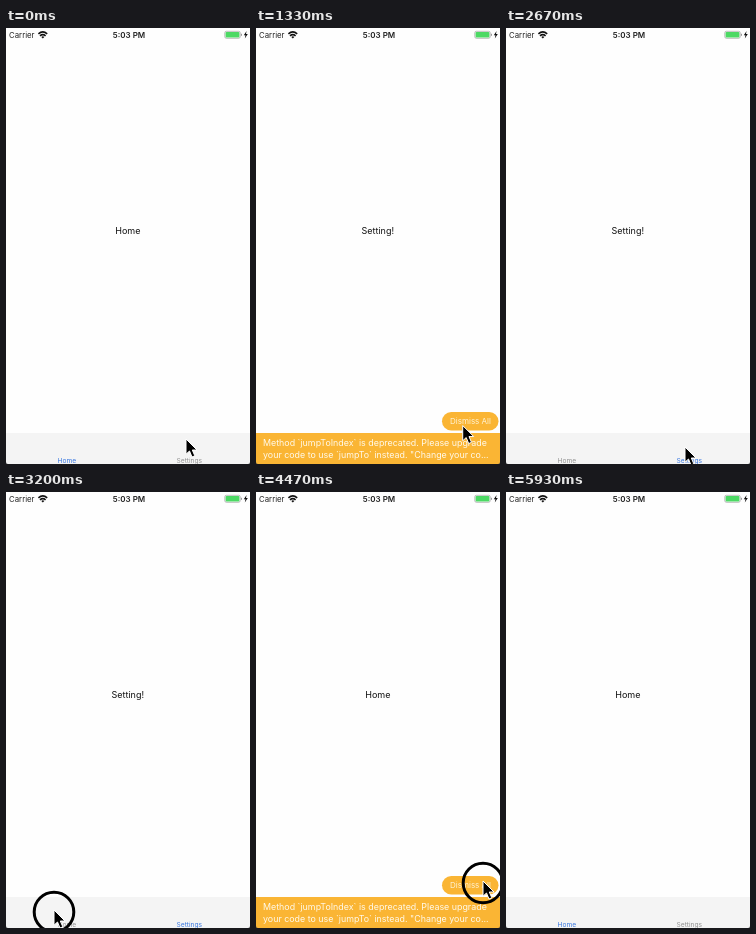
An HTML page that plays this animation: 244 px wide and 436 px high, repeating every 5.99 s.

```html
<!DOCTYPE html>
<html lang="en">
<head>
<meta charset="utf-8">
<title>Tab navigation</title>
<style>
  html, body { margin: 0; width: 100%; height: 100%; overflow: hidden; background: #fff; }
  svg { display: block; width: 244px; height: 436px; font-family: Inter, Roboto, sans-serif; }
  text { white-space: pre; }
  .mid { text-anchor: middle; }
  .status { font-size: 7.8px; fill: #222; }
  .time { font-size: 8px; font-weight: 600; }
  .title { font-size: 9px; fill: #111; }
  .tab { font-size: 6.65px; fill: #929292; }
  .tab.on { fill: #3a78e0; }
  .warn { fill: #fab534; }
  .note { font-size: 8.9px; fill: #fff9ea; }
  .dismiss { font-size: 8px; fill: #fff3d6; }
</style>
</head>
<body>
<svg viewBox="0 0 244 436">
  <rect width="244" height="436" fill="#fefefe"/>

  <text class="status" x="3" y="9.7">Carrier</text>
  <g fill="none" stroke="#111" stroke-width="1.6">
    <path d="M32.4 5.8Q36.8 2 41.2 5.8"/>
    <path d="M34 7.8Q36.8 5.4 39.6 7.8"/>
  </g>
  <path d="M35.3 8.9Q36.8 7.8 38.3 8.9L36.8 10.4Z" fill="#111"/>
  <text class="status time mid" x="123" y="9.8">5:03 PM</text>
  <rect x="218.8" y="3.3" width="15.4" height="7" rx="1.6" fill="#fff" stroke="#8d8d8d" stroke-width=".6"/>
  <rect x="219.6" y="4.1" width="13.8" height="5.4" rx=".9" fill="#4cd964"/>
  <path d="M235 5.5q1 .2 1 1.3t-1 1.3z" fill="#8d8d8d"/>
  <path d="M240.6 3L237.8 7.2H239.5L238.8 10.4L241.8 6H240Z" fill="#111"/>

  <text class="title mid" id="title" x="121.8" y="205.5">Home</text>

  <rect y="405" width="244" height="31" fill="#f4f4f4"/>
  <text class="tab mid" id="home" x="60.8" y="434.5">Home</text>
  <text class="tab mid" id="settings" x="183.3" y="434.5">Settings</text>

  <g id="warning">
    <rect class="warn" x="186" y="384" width="56.5" height="18.5" rx="9.25"/>
    <text class="dismiss mid" x="214.5" y="396.2">Dismiss All</text>
    <rect class="warn" y="405" width="244" height="31"/>
    <text class="note" x="7" y="418.2">Method `jumpToIndex` is deprecated. Please upgrade</text>
    <text class="note" x="7" y="430.2">your code to use `jumpTo` instead. "Change your co...</text>
  </g>

  <path d="M0 434Q0 436 2 436H0ZM244 434Q244 436 242 436H244Z" fill="#444"/>

  <g id="pointer">
    <circle id="ring" cy="2" r="19.8" fill="none" stroke="#000" stroke-width="3"/>
    <path d="M0 0V15.2L3.5 12L6 18L8.8 16.8L6.3 11H11Z" fill="#000" stroke="#fff" stroke-width="1" stroke-linejoin="round"/>
  </g>
</svg>
<script>
  const LOOP = 5990, STEP = 1000 / 15;
  const el = id => document.getElementById(id);
  const [title, home, settings, warning, pointer, ring] =
    ['title', 'home', 'settings', 'warning', 'pointer', 'ring'].map(el);

  // Pointer stops: [step, x, y]
  const path = [
    [0, 180, 411], [1, 180, 415], [3, 180, 415], [8, 183, 422], [14, 183, 422],
    [23, 215, 389], [29, 215, 389], [32, 179, 419], [40, 179, 419],
    [48, 48, 418], [56, 48, 418], [64, 226, 388], [65, 227, 389],
    [79, 227, 389], [86, 20, -22], [90, 20, -22]
  ];
  // Half-open step ranges
  const onSettings = [[10, 49]];
  const warned = [[11, 25], [50, 68]];
  const pressed = [[8, 10], [24, 25], [48, 49], [67, 68]];

  const within = (n, ranges) => ranges.some(([a, b]) => n >= a && n < b);
  const ease = u => u * u * (3 - 2 * u);
  const show = (node, on) => node.style.visibility = on ? 'visible' : 'hidden';

  function pointerAt(n) {
    const i = path.findIndex(p => p[0] > n);
    const [a, x, y] = path[i - 1], [b, x2, y2] = path[i];
    const k = ease((n - a) / (b - a));
    return [x + (x2 - x) * k, y + (y2 - y) * k];
  }

  function draw(time) {
    const n = Math.min(89, Math.floor((time % LOOP + 4) / STEP));
    const second = within(n, onSettings);
    title.textContent = second ? 'Setting!' : 'Home';
    home.classList.toggle('on', !second);
    settings.classList.toggle('on', second);
    show(warning, within(n, warned));
    show(ring, within(n, pressed));
    pointer.setAttribute('transform', `translate(${pointerAt(n)})`);
  }

  const start = performance.now();
  function tick() {
    draw(performance.now() - start);
    requestAnimationFrame(tick);
  }
  tick();
</script>
</body>
</html>
```
